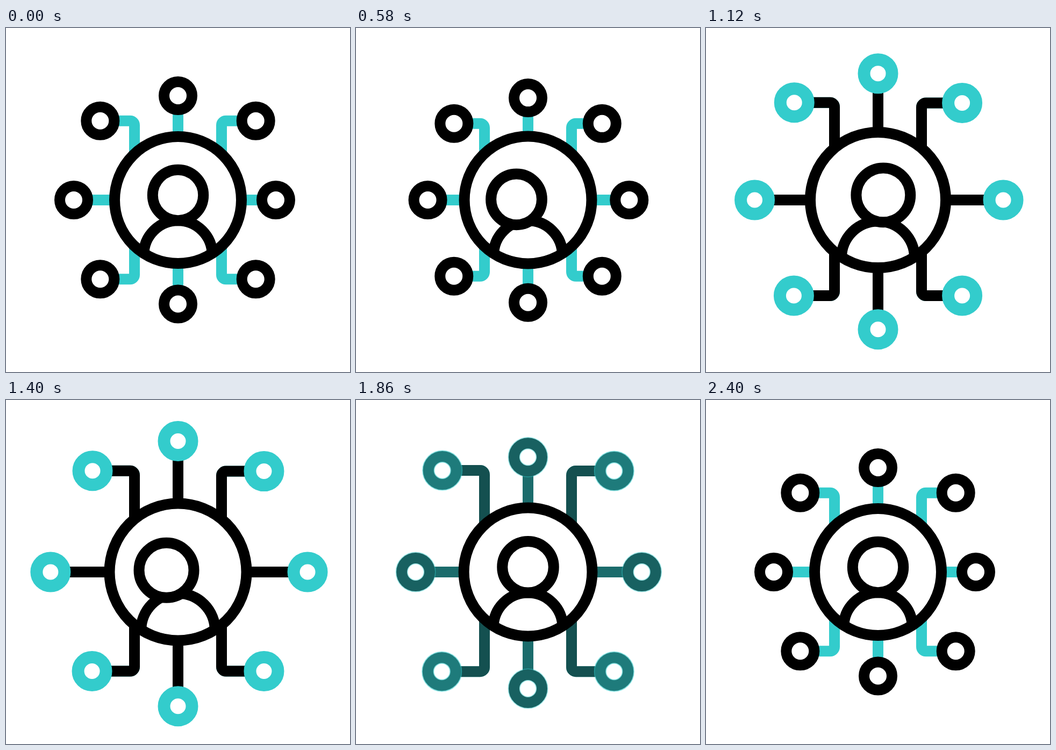
An HTML page with a canvas that plays this animation: 640 by 640 pixels, repeating every 2.8 s.

```html
<!DOCTYPE html>
<html lang="en">
<head>
<meta charset="utf-8">
<title>Network user icon</title>
<style>
  html, body { margin: 0; height: 100%; overflow: hidden; background: #fff; }
  canvas { display: block; width: 640px; height: 640px; }
</style>
</head>
<body>
<canvas id="stage" width="640" height="640"></canvas>
<script>
const ctx = document.getElementById('stage').getContext('2d');
const LOOP = 2800, MID = 320, TEAL = '#33cccc', BLACK = '#000';

const clamp = v => Math.max(0, Math.min(1, v));
const mix = (a, b, p) => a + (b - a) * p;
const smooth = p => p * p * (3 - 2 * p);

// Cubic bezier easing (.077, 0, .231, 1), solved by bisection
function burst(p) {
  let lo = 0, hi = 1;
  for (let i = 0; i < 24; i++) {
    const s = (lo + hi) / 2, u = 1 - s;
    if (3 * u * u * s * .077 + 3 * u * s * s * .231 + s * s * s < p) lo = s;
    else hi = s;
  }
  return smooth(lo);
}

// Each key is [time, value, easing into it]
function track(t, keys) {
  const i = keys.findIndex(k => k[0] > t);
  if (i < 0) return keys[keys.length - 1][1];
  if (i === 0) return keys[0][1];
  const [t0, a] = keys[i - 1], [t1, b, ease = smooth] = keys[i];
  return mix(a, b, ease((t - t0) / (t1 - t0)));
}

// Rest, pull in, burst outwards, pull in again, settle
const pulse = (t, [start, wideEnd, tightAgain], rest, tight, wide) => track(t, [
  [0, rest], [start, tight], [1700, wide, burst], [wideEnd, wide],
  [tightAgain, tight], [2400, rest]
]);

const CORE = [290, 1700, 2020], AXIS = [500, 1700, 2020], DIAGONAL = [500, 1820, 2240];

// Direction, then rest, tight and wide distance from the middle
const axisNodes = [
  [0, -1, 194, 182, 246], [0, 1, 193.5, 182, 252.5],
  [-1, 0, 194, 179, 239.5], [1, 0, 182, 180.5, 243.5]
];
// Side, then wide distances in x and y
const diagonalNodes = [
  [-1, -1, 160, 190.5], [1, -1, 161, 189.5],
  [-1, 1, 161, 186.5], [1, 1, 161, 186.5]
];

const headKeys = [
  [60, 0], [540, -21.5], [590, -21.5], [910, 21], [1000, 21],
  [1360, -21.5], [1410, -21.5], [1690, 0]
];

const fade = (t, inStart, inEnd, outStart, outEnd) =>
  clamp((t - inStart) / (inEnd - inStart)) - clamp((t - outStart) / (outEnd - outStart));

function stroke(color, width = 20, alpha = 1) {
  ctx.globalAlpha = alpha;
  ctx.strokeStyle = color;
  ctx.lineWidth = width;
  ctx.stroke();
  ctx.globalAlpha = 1;
}

function disc(x, y, r) {
  ctx.beginPath();
  ctx.arc(x, y, r, 0, 2 * Math.PI);
  ctx.fill();
}

function node(x, y, swap) {
  disc(x, y, 26);
  stroke(BLACK, 20);
  if (swap > 0) stroke(TEAL, 23, swap);
}

function link(swap) {
  stroke(TEAL);
  if (swap > 0) stroke(BLACK, 20, swap);
}

function draw(t) {
  const axisSwap = fade(t, 600, 800, 1740, 1970);
  const diagonalSwap = fade(t, 660, 900, 1770, 2000);
  const r = pulse(t, CORE, 118, 111, 128);
  const nodes = [];

  ctx.fillStyle = '#fff';
  ctx.fillRect(0, 0, 640, 640);

  for (const [dx, dy, ...poses] of axisNodes) {
    const d = pulse(t, AXIS, ...poses);
    const x = MID + dx * d, y = MID + dy * d;
    ctx.beginPath();
    ctx.moveTo(MID, MID);
    ctx.lineTo(x, y);
    link(axisSwap);
    nodes.push([x, y, axisSwap]);
  }

  for (const [sx, sy, wideX, wideY] of diagonalNodes) {
    const x = MID + sx * pulse(t, DIAGONAL, 144.7, 134.5, wideX);
    const y = MID + sy * pulse(t, DIAGONAL, 147.3, 135.5, wideY);
    const bend = MID + sx * 81;
    ctx.beginPath();
    ctx.moveTo(x, y);
    ctx.arcTo(bend, y, bend, MID, 8);
    ctx.lineTo(bend, MID + sy * 60);
    link(diagonalSwap);
    nodes.push([x, y, diagonalSwap]);
  }

  for (const n of nodes) node(...n);

  disc(MID, MID, r);
  stroke(BLACK);

  ctx.beginPath();
  ctx.arc(MID, 422 + .7 * (r - 118), .54 * r, Math.PI, 2 * Math.PI);
  stroke(BLACK);

  const shift = track(t, headKeys);
  const headY = 311 - .22 * (r - 118) + 7.5 * (shift / 21) ** 2;
  disc(MID + shift, headY, .4 * r);
  stroke(BLACK);
}

function tick() {
  draw(performance.now() % LOOP);
  requestAnimationFrame(tick);
}
tick();
</script>
</body>
</html>
```
